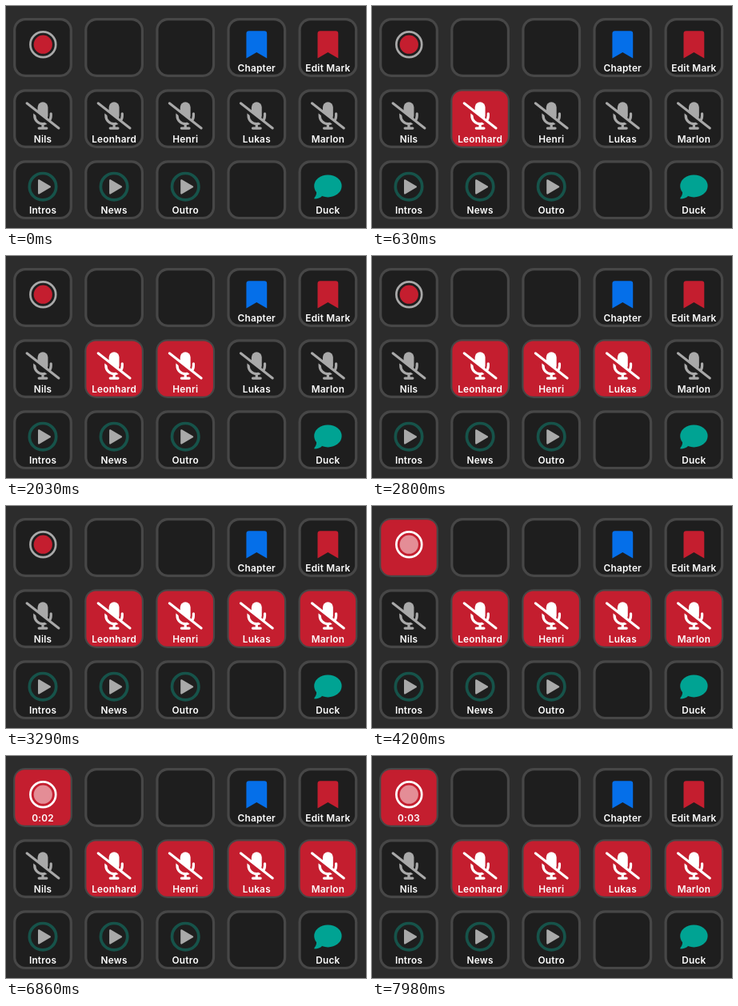
An HTML page with a canvas that plays this animation: 450 by 278 pixels, repeating every 8 s.

```html
<!DOCTYPE html>
<html lang="en">
<head>
<meta charset="utf-8">
<title>Podcast control deck</title>
<style>
  html, body { margin: 0; width: 100%; height: 100%; overflow: hidden; background: #2c2c2c; }
  canvas { display: block; width: 450px; height: 278px; }
</style>
</head>
<body>
<canvas id="deck"></canvas>
<script>
const W = 450, H = 278, LOOP = 8000;
const RED = '#c41e2f', DARK = '#1e1e1e', GRAY = '#a9a9a9', WHITE = '#fff';
const RECORD_AT = 4060, TIMER_AT = 4410;

const canvas = document.getElementById('deck');
const ctx = canvas.getContext('2d');
const ratio = window.devicePixelRatio || 1;
canvas.width = W * ratio;
canvas.height = H * ratio;

// on: time at which the key turns red
const keys = [
  { icon: record, on: RECORD_AT }, {}, {},
  { icon: bookmark, label: 'Chapter', color: '#056fe9' },
  { icon: bookmark, label: 'Edit Mark', color: RED },
  { icon: mic, label: 'Nils' },
  { icon: mic, label: 'Leonhard', on: 560 },
  { icon: mic, label: 'Henri', on: 1190 },
  { icon: mic, label: 'Lukas', on: 2380 },
  { icon: mic, label: 'Marlon', on: 3150 },
  { icon: play, label: 'Intros' },
  { icon: play, label: 'News' },
  { icon: play, label: 'Outro' },
  {},
  { icon: bubble, label: 'Duck' }
];

function disc(x, y, r, color) {
  ctx.fillStyle = color;
  ctx.beginPath();
  ctx.arc(x, y, r, 0, Math.PI * 2);
  ctx.fill();
}

function ring(x, y, r, width, color) {
  ctx.strokeStyle = color;
  ctx.lineWidth = width;
  ctx.beginPath();
  ctx.arc(x, y, r, 0, Math.PI * 2);
  ctx.stroke();
}

function line(x1, y1, x2, y2, width, color) {
  ctx.strokeStyle = color;
  ctx.lineWidth = width;
  ctx.beginPath();
  ctx.moveTo(x1, y1);
  ctx.lineTo(x2, y2);
  ctx.stroke();
}

function box(x, y, w, h, r) {
  ctx.beginPath();
  ctx.roundRect(x, y, w, h, r);
}

// Icons are drawn around the centre of their key.
function record(active) {
  ring(0.3, -3.8, 15.9, 2.7, active ? WHITE : GRAY);
  disc(0.3, -3.8, 11.6, active ? '#e48d96' : RED);
}

function bookmark(active, key) {
  ctx.fillStyle = key.color;
  ctx.beginPath();
  ctx.moveTo(-12.9, 13.6);
  ctx.lineTo(-12.9, -17.6);
  ctx.quadraticCurveTo(-12.9, -20.8, -9.7, -20.8);
  ctx.lineTo(9.7, -20.8);
  ctx.quadraticCurveTo(12.9, -20.8, 12.9, -17.6);
  ctx.lineTo(12.9, 13.6);
  ctx.lineTo(0, 6.1);
  ctx.closePath();
  ctx.fill();
}

// Drawn on a 640 by 512 grid.
function mic(active) {
  const color = active ? WHITE : GRAY, back = active ? RED : DARK;
  const diagonal = (x1, x2, drop, width, paint) =>
    line(x1, 4 + x1 * 0.783 + drop, x2, 4 + x2 * 0.783 + drop, width, paint);
  ctx.save();
  ctx.scale(0.0672, 0.0672);
  ctx.translate(-320, -310);
  ctx.fillStyle = color;
  box(224, 0, 192, 352, 96);
  ctx.fill();
  diagonal(160, 400, 110, 170, back);
  ctx.strokeStyle = color;
  ctx.lineWidth = 48;
  ctx.beginPath();
  ctx.moveTo(168, 216);
  ctx.lineTo(168, 256);
  ctx.arc(320, 256, 152, Math.PI, 0, true);
  ctx.lineTo(472, 216);
  ctx.stroke();
  line(320, 420, 320, 480, 48, color);
  line(248, 488, 392, 488, 48, color);
  diagonal(144, 420, 47, 73, back);
  diagonal(24, 616, 0, 46, color);
  ctx.restore();
}

function play() {
  ring(0, -4, 16.7, 3.7, '#16534a');
  ctx.fillStyle = ctx.strokeStyle = GRAY;
  ctx.lineWidth = 2;
  ctx.beginPath();
  ctx.moveTo(-5, -12);
  ctx.lineTo(9, -3.8);
  ctx.lineTo(-5, 4.4);
  ctx.closePath();
  ctx.fill();
  ctx.stroke();
}

function bubble() {
  ctx.fillStyle = '#00a393';
  ctx.beginPath();
  ctx.ellipse(0, -4.8, 17.2, 14, 0, 0, Math.PI * 2);
  ctx.fill();
  ctx.beginPath();
  ctx.moveTo(-14.5, 1);
  ctx.quadraticCurveTo(-13.5, 6, -17, 10);
  ctx.quadraticCurveTo(-17.4, 11.4, -16.4, 11.4);
  ctx.quadraticCurveTo(-11, 11.2, -7, 7.5);
  ctx.closePath();
  ctx.fill();
}

function text(label) {
  ctx.fillStyle = WHITE;
  ctx.fillText(label, 0, 29.5);
}

function drawKey(key, i, t) {
  const active = t >= key.on;
  const half = active ? 34.7 : 33.7;
  ctx.save();
  ctx.translate(46 + i % 5 * 89.1, 52 + Math.floor(i / 5) * 89.1);
  ctx.fillStyle = '#474747';
  box(-36.9, -36.9, 73.8, 73.8, 15);
  ctx.fill();
  ctx.fillStyle = active ? RED : DARK;
  box(-half, -half, half * 2, half * 2, 12);
  ctx.fill();
  if (key.icon) key.icon(active, key);
  if (key.label) text(key.label);
  if (key.icon === record && t >= TIMER_AT) {
    text('0:0' + Math.floor((t - RECORD_AT) / 1000));
  }
  ctx.restore();
}

function draw(t) {
  ctx.setTransform(ratio, 0, 0, ratio, 0, 0);
  ctx.fillStyle = '#2c2c2c';
  ctx.fillRect(0, 0, W, H);
  ctx.lineCap = ctx.lineJoin = 'round';
  ctx.textAlign = 'center';
  ctx.font = '600 11.8px Inter, Roboto, sans-serif';
  ctx.letterSpacing = '0.25px';
  keys.forEach((key, i) => drawKey(key, i, t));
}

const start = performance.now();
function tick() {
  draw((performance.now() - start) % LOOP);
  requestAnimationFrame(tick);
}
tick();
</script>
</body>
</html>
```
